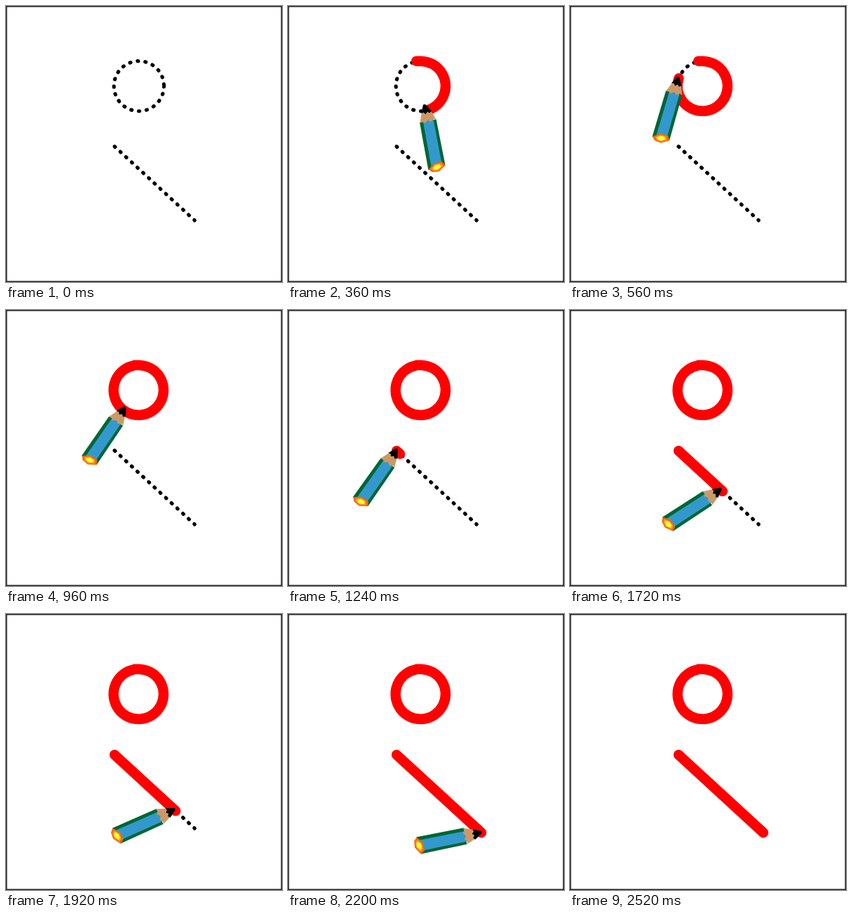
An HTML page for the animation above (2560 ms loop, 394 px wide and 394 px high).

```html
<!DOCTYPE html>
<html lang="en">
<head>
<meta charset="utf-8">
<title>Tracing a circle and a line</title>
<style>
html, body { margin: 0; width: 100%; height: 100%; overflow: hidden; background: #fff; }
svg { display: block; width: 100%; height: 100%; }
.dots { fill: none; stroke: #000; stroke-width: 5.2; stroke-linecap: round; stroke-dasharray: 1 10.06; }
.ink { fill: none; stroke: #f00; stroke-width: 14.5; stroke-linecap: round; }
</style>
</head>
<body>
<svg viewBox="0 0 394 394">
  <defs><path id="cap" d="M-12.5 1L-3 -6.5L8.5 -6.5L12.3 -.5L1.5 6.5L-8 5.5Z"/></defs>
  <rect x=".75" y=".75" width="392.5" height="392.5" fill="#fff" stroke="#222" stroke-width="1.5"/>
  <circle class="dots" cx="189.8" cy="114.3" r="35.7"/>
  <path class="dots" d="M155 200.6L269.2 306"/>
  <path class="ink" id="ring" pathLength="1" d="M183.2 78.7H190A35.7 35.7 0 1 1 183.2 79.2"/>
  <path class="ink" id="line" pathLength="1" d="M155 201L276 312.2"/>
  <g id="pencil">
    <path fill="#063" d="M-11 24H13L14 91L-11 93Z"/>
    <path fill="#39c" d="M-6 21H9L9.5 92H-6Z"/>
    <path fill="#c96" d="M-5 9H7L13 24L9 22.5L5.5 26L1 23L-4 26.5L-7 23.5L-11 25.5Z"/>
    <path d="M-1.5 0H1.5L8.5 11L5.5 13.5L2.5 11L-.5 14L-3 11L-6.5 12Z"/>
    <g transform="translate(1.8 91.5)">
      <use href="#cap" fill="#f60"/>
      <use href="#cap" fill="#f93" transform="scale(.72)"/>
      <use href="#cap" fill="#ff3" transform="scale(.5)"/>
    </g>
  </g>
</svg>
<script>
const LOOP = 2560, STEP = 40;
const [ring, line, pencil] = ["ring", "line", "pencil"].map(id => document.getElementById(id));

const part = (t, from, to) => Math.min(1, Math.max(0, (t - from) / (to - from)));
const mix = (a, b, k) => a + (b - a) * k;

function trace(path, k) {
  path.setAttribute("stroke-dasharray", `${k} 2`);
  path.setAttribute("visibility", k > 0 ? "visible" : "hidden");
}

// Pencil pose as [x, y, tilt]: round the ring, down to the line, along the line
function pose(t) {
  if (t < 660) {
    const k = part(t, 80, 660), a = mix(-101, 259, k) * Math.PI / 180;
    return [185 + 32 * Math.cos(a), 110 + 32 * Math.sin(a), mix(-48, 30, k)];
  }
  if (t < 1240) {
    const k = part(t, 660, 1240);
    return [mix(185.5, 155.5, k), mix(74, 198, k), mix(34, 35.5, k)];
  }
  const k = part(t, 1240, 2200);
  return [mix(155.5, 276.5, k), mix(198, 311.5, k), mix(35.5, 79, k)];
}

function draw(t) {
  trace(ring, part(t, 80, 660));
  trace(line, part(t, 1200, 2200));
  const [x, y, tilt] = pose(t);
  pencil.setAttribute("transform", `translate(${x} ${y}) rotate(${tilt})`);
  pencil.setAttribute("opacity", t < STEP ? 0 : 1 - part(t, 2240, 2520));
}

const begin = performance.now();
function tick() {
  const t = (performance.now() - begin) % LOOP;
  draw(Math.floor(t / STEP) * STEP);
  requestAnimationFrame(tick);
}
tick();
</script>
</body>
</html>
```
